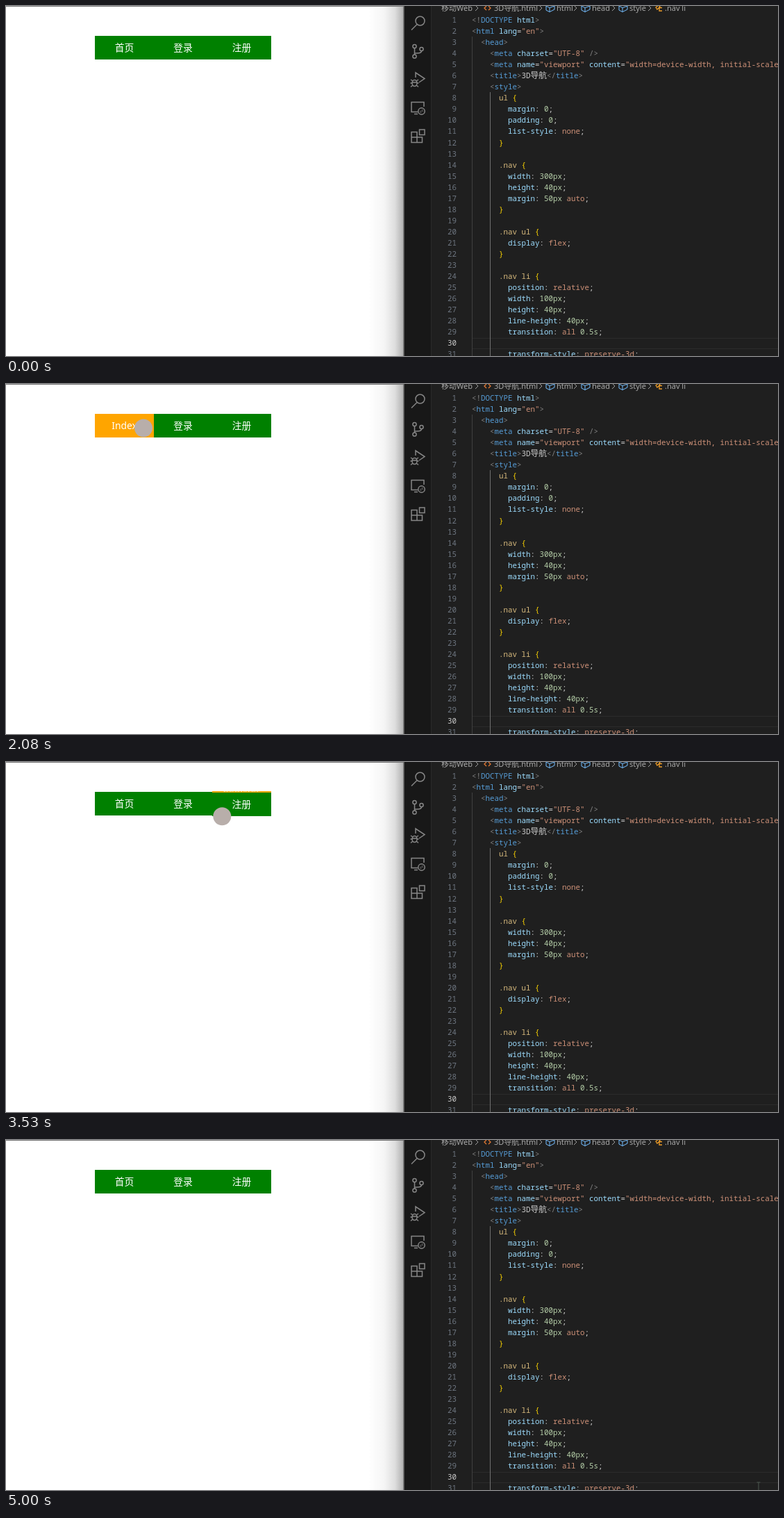
These frames come from a looping animation (1112 px wide and 504 px high, 5.62 s). An HTML page:

```html
<!DOCTYPE html>
<html lang="zh">
<head>
<meta charset="UTF-8">
<title>3D navigation</title>
<style>
  html, body { margin: 0; width: 100%; height: 100%; overflow: hidden; background: #fff; }
  #stage { position: relative; width: 1112px; height: 504px; overflow: hidden; }
  #stage > * { position: absolute; }
  svg { left: 0; top: 0; }

  .item { top: 43px; width: 84.5px; height: 34px; }
  .face {
    position: absolute; inset: 0; color: #fff; background: green; text-align: center;
    font: 13.8px/34px "Noto Sans", "Noto Sans CJK SC", sans-serif;
  }
  .top { background: orange; }

  #code, #numbers {
    top: 12px; white-space: pre; color: #ccc;
    font: 10.83px/16.06px "Noto Sans Mono", "Noto Sans CJK SC", monospace;
  }
  #code { left: 671px; }
  #numbers { left: 613px; width: 36px; text-align: right; color: #6e7681; }
  #code div, #numbers div { height: 16.06px; }
  #numbers .current { color: #ccc; }
  .cjk { font-size: 11.8px; line-height: 0; }
  .punct { color: #808080; }
  .tag { color: #569cd6; }
  .attr { color: #9cdcfe; }
  .string { color: #ce9178; }
  .number { color: #b5cea8; }
  .selector { color: #d7ba7d; }
  .brace { color: #ffd700; }
</style>
</head>
<body>
<div id="stage">
  <svg width="1112" height="504" fill="none">
    <defs>
      <linearGradient id="shadow">
        <stop offset="0" stop-opacity="0"/>
        <stop offset=".45" stop-opacity=".04"/>
        <stop offset=".75" stop-opacity=".13"/>
        <stop offset="1" stop-opacity=".32"/>
      </linearGradient>
      <path id="cube" d="M-6 -3 1 -5.500 6 -3 6 2 -1 5.500 -6 3ZM-6 -3 -1 -.5 6 -3M-1 -.5V5.500" stroke="#75beff"/>
      <path id="fold" d="M-4 -2 0 2 4 -2" stroke="#b0b0b0"/>
      <path id="crumb" d="M-2 -4 2 0 -2 4" stroke="#9d9d9d"/>
    </defs>
    <path d="M0 .5H573" stroke="#777"/>
    <rect x="522" y="1" width="51" height="503" fill="url(#shadow)"/>
    <rect x="573" width="40" height="504" fill="#181818"/>
    <rect x="613" width="499" height="504" fill="#1f1f1f"/>
    <path d="M573 0V504" stroke="#666" stroke-width="1.500"/>
    <path d="M612.500 0V504M671 478.500H1112M671 493.500H1112" stroke="#2b2b2b"/>
    <path d="M671.500 44V504" stroke="#404040"/>
    <path d="M697.500 124V504" stroke="#707070"/>

    <g stroke="#868686" stroke-width="1.500">
      <circle cx="596.500" cy="21.500" r="6.500"/>
      <path d="M592 26.500 584 34.500"/>
      <circle cx="588.500" cy="58" r="2.600"/>
      <circle cx="588.500" cy="72.500" r="2.600"/>
      <circle cx="598.500" cy="62" r="2.600"/>
      <path d="M588.500 60.600V70M598.500 64.600C598.500 68 595 68 588.500 68"/>
      <path d="M590 103V96L603 104.500 595 110"/>
      <ellipse cx="588.500" cy="111" rx="3.500" ry="4.500"/>
      <path d="M583 106 586 108M594 106 591 108M582.500 111H585M592 111H594.500M583 116.500 586 114M594 116.500 591 114M585 110H592"/>
      <path d="M593 152.500H584V138.500H602V145M588 155.500H593"/>
      <circle cx="598.500" cy="151.500" r="4.700"/>
      <path d="M596.500 151 598 152.500 596.500 154M600.500 149 599 150.500 600.500 152" stroke-width="1"/>
      <path d="M584 181.500H592V189H599.500V196.500H584ZM584 189H592V196.500"/>
      <rect x="595.500" y="178" width="7.500" height="7.500"/>
    </g>

    <g fill="#a9a9a9" font-size="11" font-family="Noto Sans, Noto Sans CJK SC, sans-serif">
      <text x="627" y="7">移动Web</text>
      <text x="703" y="7">3D导航.html</text>
      <text x="793" y="7">html</text>
      <text x="844" y="7">head</text>
      <text x="898" y="7">style</text>
      <text x="949" y="7">.nav li</text>
    </g>
    <use href="#crumb" x="678" y="3"/><use href="#crumb" x="770" y="3"/>
    <use href="#crumb" x="820" y="3"/><use href="#crumb" x="875" y="3"/>
    <use href="#crumb" x="927" y="3"/>
    <use href="#cube" x="784" y="3"/><use href="#cube" x="835" y="3"/><use href="#cube" x="889" y="3"/>
    <path d="M692 0 689 3 692 6M695 0 698 3 695 6" stroke="#e37933" stroke-width="1.300"/>
    <path d="M936 2 940 -1 942 1 938 5ZM940 2.500H945M941 3V7H945" stroke="#ee9d28" stroke-width="1.300"/>
    <g id="folds"></g>
  </svg>
  <div id="numbers"></div>
  <div id="code"></div>
  <svg id="pointer" width="1112" height="504">
    <circle id="blob" r="13" fill="#b8aeaa"/>
    <path id="beam" d="M-2.500 -7H2.500M0 -7V7M-2.500 7H2.500" stroke="#4c5850"/>
  </svg>
</div>
<script>
const LOOP = 5620, FLIP = 500, HALF = 17, LINE = 16.06;
const $ = id => document.getElementById(id);

const source = `<!DOCTYPE html>
<html lang="en">
  <head>
    <meta charset="UTF-8" />
    <meta name="viewport" content="width=device-width, initial-scale=1.0" />
    <title>3D导航</title>
    <style>
      ul {
        margin: 0;
        padding: 0;
        list-style: none;
      }

      .nav {
        width: 300px;
        height: 40px;
        margin: 50px auto;
      }

      .nav ul {
        display: flex;
      }

      .nav li {
        position: relative;
        width: 100px;
        height: 40px;
        line-height: 40px;
        transition: all 0.5s;

        transform-style: preserve-3d;`.split('\n');

const span = (kind, text) => `<span class="${kind}">${text.replace(/</g, '&lt;')}</span>`;
const markup = /(?<string>"[^"]*")|(?<punct><[!\/]?|\/?>)|(?<attr>[\w-]+(?==)|(?<=DOCTYPE )html)|(?<tag>(?<=[<!\/])\w+)|(?<cjk>[\u4e00-\u9fff]+)/g;

function highlight(line) {
  const rule = line.match(/^(\s+)([\w-]+): (.*);$/);
  if (rule) {
    const values = rule[3].split(' ').map(v => span(/^\d/.test(v) ? 'number' : 'string', v));
    return `${rule[1]}${span('attr', rule[2])}: ${values.join(' ')};`;
  }
  if (/[{}]$/.test(line)) return span('selector', line.slice(0, -1)) + span('brace', line.slice(-1));
  return line.replace(markup, (text, ...rest) => {
    const groups = rest.at(-1);
    return span(Object.keys(groups).find(kind => groups[kind]), text);
  });
}

$('code').innerHTML = source.map(line => `<div>${highlight(line)}</div>`).join('');
$('numbers').innerHTML = source.map((_, i) =>
  `<div class="${i === 29 ? 'current' : ''}">${i + 1}</div>`).join('');
$('folds').innerHTML = [2, 3, 7, 8, 14, 20, 24].map(n =>
  `<use href="#fold" x="661.500" y="${20.5 + (n - 1) * LINE}"/>`).join('');

// Each entry in "switches" toggles the hover state, starting with "on".
const items = [
  { front: '首页', top: 'Index', switches: [1480, 2185] },
  { front: '登录', top: 'Login', switches: [1405, 1480, 2185, 2685, 3940, 4415] },
  { front: '注册', top: 'Register', switches: [2685, 3155, 4425, 4475] },
];
items.forEach((item, i) => {
  const box = document.createElement('div');
  box.className = 'item';
  box.style.left = 128.3 + i * 84.5 + 'px';
  box.innerHTML = `<div class="face">${item.front}</div><div class="face top">${item.top}</div>`;
  $('stage').insertBefore(box, $('pointer'));
  item.faces = box.children;
});

// Pointer stops: time, x, y.
const path = [
  [110, 1083, 498], [350, 890, 450], [590, 690, 385], [670, 631, 365], [890, 631, 365],
  [972, 595, 320], [1053, 520, 255], [1135, 425, 180], [1215, 350.5, 127], [1255, 350.5, 127],
  [1380, 262, 81], [1460, 220, 69], [1600, 198, 63.5], [2120, 198, 63.5], [2250, 235, 63],
  [2520, 270, 62], [2610, 312, 62], [2700, 345, 62], [2920, 366, 63], [3080, 366, 64],
  [3150, 395, 120], [3190, 421, 224], [3230, 412, 212], [3310, 398, 190], [3530, 312, 78],
  [3680, 275, 88], [3830, 255, 86], [3960, 254, 66], [4340, 258, 66], [4410, 297, 72],
  [4440, 430, 130], [4470, 565, 189], [4540, 680, 262], [4700, 900, 400], [4920, 1078, 492],
  [5000, 1084, 500],
];

// Runs of evenly spaced screen updates: first, last, count.
const bursts = [
  [110, 670, 8], [750, 750, 1], [890, 1380, 7], [1460, 2000, 8], [2080, 2610, 8],
  [2690, 3230, 8], [3310, 3830, 8], [3920, 4470, 8], [4540, 5000, 7],
];

const clamp = v => Math.min(1, Math.max(0, v));

function lastUpdate(t) {
  const burst = bursts.findLast(([first]) => t >= first);
  if (!burst) return 0;
  const [first, last, count] = burst;
  const step = (last - first) / (count - 1) || 1;
  return first + step * Math.min(count - 1, Math.floor((t + 5 - first) / step));
}

// CSS "ease": cubic-bezier(.25, .1, .25, 1)
function ease(x) {
  const curve = (a, b, u) => 3 * a * u * (1 - u) ** 2 + 3 * b * u * u * (1 - u) + u ** 3;
  let low = 0, high = 1;
  for (let i = 0; i < 24; i++) {
    const mid = (low + high) / 2;
    if (curve(.25, .25, mid) < x) low = mid; else high = mid;
  }
  return curve(.1, 1, low);
}

function turn(switches, t) {
  let value = 0;
  switches.forEach((start, i) => {
    if (t <= start) return;
    const goal = i % 2 ? 0 : 1;
    const until = Math.min(t, switches[i + 1] ?? t);
    const duration = FLIP * Math.abs(goal - value) || 1;
    value += (goal - value) * ease(clamp((until - start) / duration));
  });
  return value > .999 ? 1 : value < .001 ? 0 : value;
}

function pointerAt(t) {
  const next = path.findIndex(([time]) => time >= t);
  if (next < 1) return path.at(next).slice(1);
  const [t0, x0, y0] = path[next - 1], [t1, x1, y1] = path[next];
  const k = (t - t0) / (t1 - t0);
  return [x0 + (x1 - x0) * k, y0 + (y1 - y0) * k];
}

function place(face, shift, scale) {
  face.style.visibility = scale < .01 ? 'hidden' : 'visible';
  face.style.transform = scale > .999 ? 'none' : `translateY(${shift}px) scaleY(${scale})`;
}

function draw(t) {
  for (const { faces, switches } of items) {
    const angle = turn(switches, t) * Math.PI / 2;
    const sin = Math.sin(angle), cos = Math.cos(angle);
    place(faces[0], HALF * sin, cos);
    place(faces[1], -HALF * cos, sin);
  }
  $('folds').style.opacity = clamp((t - 590) / 160) * clamp((1380 - t) / 80);

  const [x, y] = pointerAt(t);
  const editing = x > 668;
  $('pointer').style.visibility = t < 110 ? 'hidden' : 'visible';
  $('blob').style.display = editing ? 'none' : '';
  $('beam').style.display = editing ? '' : 'none';
  $(editing ? 'beam' : 'blob').setAttribute('transform', `translate(${x} ${y})`);
}

function tick() {
  draw(lastUpdate(performance.now() % LOOP));
  requestAnimationFrame(tick);
}
tick();
</script>
</body>
</html>
```
